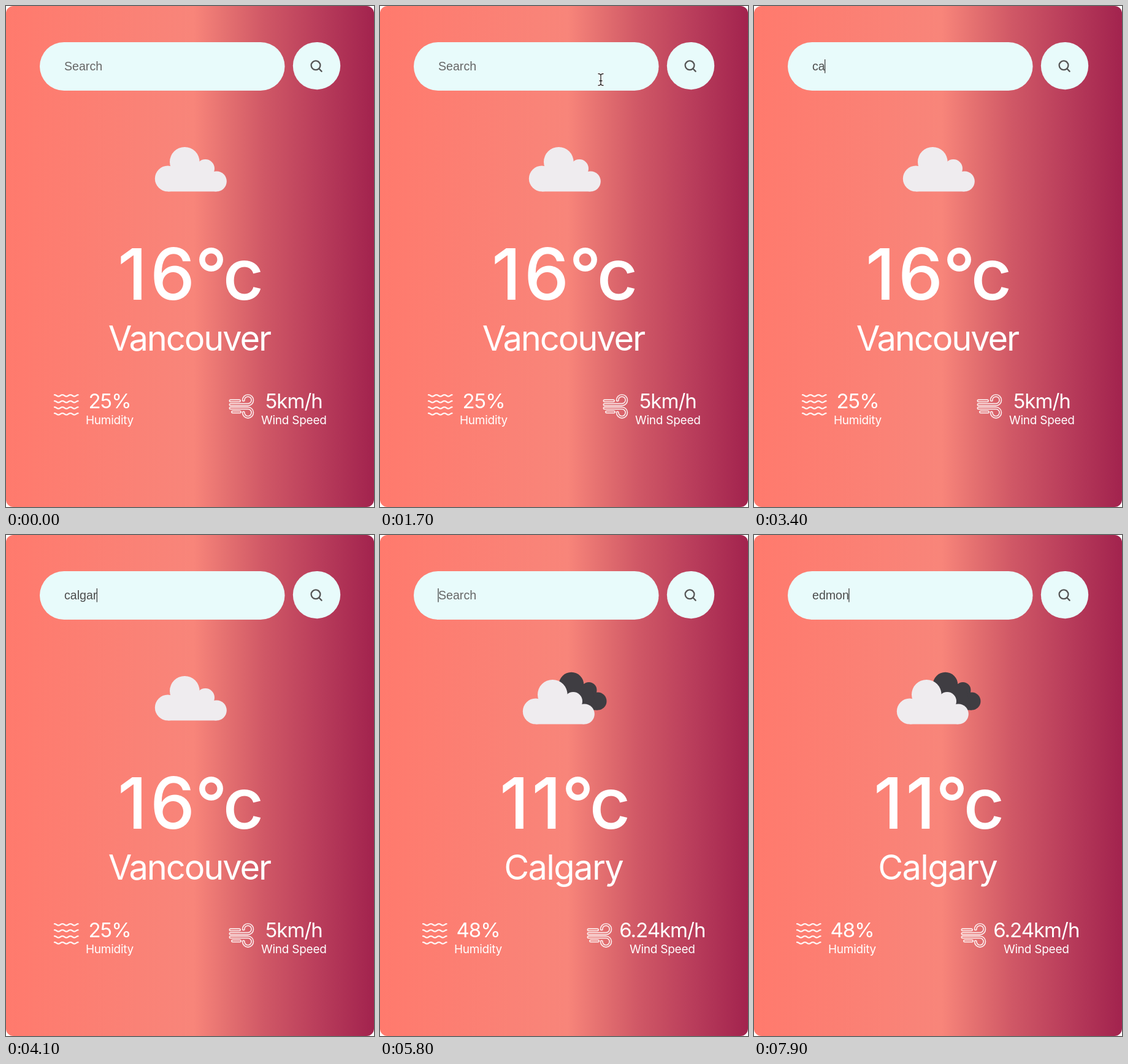
An HTML page for the animation above (8 s loop, 600x817 px).

```html
<!DOCTYPE html>
<html lang="en">
<head>
<meta charset="utf-8">
<title>Weather card</title>
<style>
html, body { margin: 0; width: 100%; height: 100%; overflow: hidden; background: #fff; }
svg { display: block; width: 600px; height: 817px; }
text { font-family: Inter, "Open Sans", sans-serif; fill: #fff; font-optical-sizing: none; }
.mid { text-anchor: middle; }
#temp { font-size: 116px; font-weight: 450; }
#city { font-size: 56px; }
.value { font-size: 33px; letter-spacing: -1px; }
.label { font-size: 19px; letter-spacing: -.25px; }
#field { font: 19.6px "Liberation Sans", Arial, sans-serif; }
#cloud, #dark { filter: blur(.6px); }
</style>
</head>
<body>
<svg viewBox="0 0 600 817">
  <defs>
    <linearGradient id="sky">
      <stop offset="0" stop-color="#ff7a6d"/>
      <stop offset=".51" stop-color="#f8857a"/>
      <stop offset=".6" stop-color="#e47070"/>
      <stop offset=".7" stop-color="#d05866"/>
      <stop offset=".85" stop-color="#b93d5b"/>
      <stop offset="1" stop-color="#a2234e"/>
    </linearGradient>
    <path id="gusts" fill="none" stroke-linecap="round" d="M2.5 17H31a7.3 7.3 0 1 0-7.3-7.3M2.5 22.8H31a7.3 7.3 0 1 1-7.3 7.3M2.5 10.7H17M6 29H18"/>
    <mask id="hollow" maskUnits="userSpaceOnUse" x="-2" y="-2" width="45" height="45">
      <use href="#gusts" stroke="#fff" stroke-width="5"/>
      <use href="#gusts" stroke="#000" stroke-width="1.6"/>
    </mask>
    <path id="wave" d="M1 1.2c3 0 4 2.4 6.5 2.4s3.5-2.4 6.5-2.4s4 2.4 6.5 2.4s3.5-2.4 6.5-2.4s4 2.4 6.5 2.4s3.5-2.4 6-2.4"/>
    <path id="bar" fill="none" stroke-linecap="round" d="M-4-9.5Q0-9.5 0-6.5Q0-9.5 4-9.5M0-6.5V6.5M-4 9.5Q0 9.5 0 6.5Q0 9.5 4 9.5M-2 2H2"/>
  </defs>

  <rect width="600" height="817" rx="12" fill="url(#sky)"/>
  <rect x="55" y="59" width="399.5" height="79" rx="39.5" fill="#e8fbfb"/>
  <circle cx="506.5" cy="97.6" r="38.7" fill="#e8fbfb"/>
  <g fill="none" stroke="#555" stroke-width="2.3" stroke-linecap="round">
    <circle cx="505" cy="96.8" r="7.4"/>
    <path d="M510.4 102.2L514.6 106.6"/>
  </g>
  <text id="field" x="95" y="104.5"></text>
  <rect id="caret" y="87" width="1.3" height="22.5" fill="#444"/>

  <g id="dark" fill="#3f3d42">
    <circle cx="312" cy="244" r="20.3"/>
    <circle cx="340.5" cy="253" r="13"/>
    <circle cx="355" cy="271" r="14.5"/>
    <path d="M300 250H345L355 285.5H300z"/>
  </g>
  <g id="cloud" fill="#efecef">
    <circle cx="291.3" cy="254.3" r="24.3"/>
    <circle cx="263.8" cy="281.5" r="21"/>
    <circle cx="325" cy="265" r="15"/>
    <circle cx="343.3" cy="286" r="16.5"/>
    <path d="M264 302.5L266 262H330L343.3 302.5z"/>
  </g>

  <text id="temp" y="479.3"></text>
  <text id="city" class="mid" y="562"></text>

  <g id="humidIcon" fill="none" stroke="#fff" stroke-opacity=".92" stroke-width="2.3" stroke-linecap="round">
    <use href="#wave" y="0"/><use href="#wave" y="10"/><use href="#wave" y="20"/><use href="#wave" y="30"/>
  </g>
  <text id="humid" class="mid value" y="656"></text>
  <text id="humidLabel" class="mid label" y="682">Humidity</text>
  <g id="windIcon"><rect x="-2" y="-2" width="45" height="45" fill="#fff" fill-opacity=".85" mask="url(#hollow)"/></g>
  <text id="wind" class="mid value" y="656"></text>
  <text id="windLabel" class="mid label" y="682">Wind Speed</text>

  <path id="arrow" d="M0 0V18.5L4.4 14.5L7.6 22L11 20.5L7.8 13.2H13.7z" fill="#000" stroke="#fff" stroke-width="1.3" stroke-linejoin="round"/>
  <g id="beam">
    <use href="#bar" stroke="#fff" stroke-width="3"/>
    <use href="#bar" stroke="#222" stroke-width="1.3"/>
  </g>
</svg>
<script>
const LOOP = 8000, TICK = 100, FOCUS = 2000, RESULT = 5400;
const $ = id => document.getElementById(id);
const set = (id, attrs) => { for (const k in attrs) $(id).setAttribute(k, attrs[k]); };
const show = (id, on) => set(id, { visibility: on ? 'visible' : 'hidden' });

const places = [
  { city: 'Vancouver', track: -2.1, temp: '16°c', ink: [187, 241, 315, 358.5], humid: '25%', wind: '5km/h',
    humidX: 169, windX: 469.3, humidIcon: 78, windIcon: 363.5, cloud: [0, 0] },
  { city: 'Calgary', track: -1.6, temp: '11°c', ink: [200, 252.5, 303, 346.5], humid: '48%', wind: '6.24km/h',
    humidX: 160, windX: 460.3, humidIcon: 69, windIcon: 337.5, cloud: [-10, 6] }
];

// Time of each edit and the field's content after it
const edits = [[0, '']];
const type = (word, times) => times.forEach((t, i) => edits.push([t, word.slice(0, i + 1)]));
type('calgary', [3200, 3400, 3500, 3700, 3800, 4000, 4200]);
edits.push([RESULT, '']);
type('edmon', [7100, 7300, 7400, 7600, 7800]);

// Pointer stops: time, x, y
const path = [[700, 600, 262], [900, 520, 176], [1100, 465, 124], [1500, 360, 120], [3200, 360, 120]];

const pen = document.createElement('canvas').getContext('2d');
pen.font = '450 116px Inter, "Open Sans", sans-serif';
const inkStart = (ch, x) => x + pen.measureText(ch).actualBoundingBoxLeft;

let shown;
function showPlace(p) {
  if (p === shown) return;
  shown = p;
  for (const id of ['city', 'temp', 'humid', 'wind']) $(id).textContent = p[id];
  set('temp', { x: [...p.temp].map((ch, i) => inkStart(ch, p.ink[i])).join(' ') });
  set('city', { x: 300 + p.track / 2, 'letter-spacing': p.track });
  for (const id of ['humid', 'humidLabel']) set(id, { x: p.humidX });
  for (const id of ['wind', 'windLabel']) set(id, { x: p.windX });
  set('humidIcon', { transform: `translate(${p.humidIcon} 633)` });
  set('windIcon', { transform: `translate(${p.windIcon} 633)` });
  set('cloud', { transform: `translate(${p.cloud})` });
  show('dark', p === places[1]);
}

function showField(t) {
  const [since, word] = edits.filter(e => e[0] <= t).pop();
  const field = $('field');
  field.textContent = word || 'Search';
  field.style.fill = word ? '#4c4c4c' : '#666';
  const lit = (t - Math.max(since, FOCUS)) % 1000 < 500;
  show('caret', t >= FOCUS && lit);
  set('caret', { x: 94.3 + (word ? field.getComputedTextLength() : 0) });
}

function showPointer(t) {
  const i = path.findIndex((a, n) => n + 1 < path.length && t >= a[0] && t < path[n + 1][0]);
  let x = 600, y = 0;
  if (i >= 0) {
    const [a, b] = [path[i], path[i + 1]];
    const k = (t - a[0]) / (b[0] - a[0]);
    x = a[1] + (b[1] - a[1]) * k;
    y = a[2] + (b[2] - a[2]) * k;
  }
  const inField = x < 454;
  show('arrow', i >= 0 && !inField);
  show('beam', i >= 0 && inField);
  for (const id of ['arrow', 'beam']) set(id, { transform: `translate(${x} ${y})` });
}

const start = performance.now();
function draw() {
  const t = Math.floor((performance.now() - start) % LOOP / TICK) * TICK;
  showPlace(places[t < RESULT ? 0 : 1]);
  showField(t);
  showPointer(t);
  requestAnimationFrame(draw);
}
draw();
</script>
</body>
</html>
```
